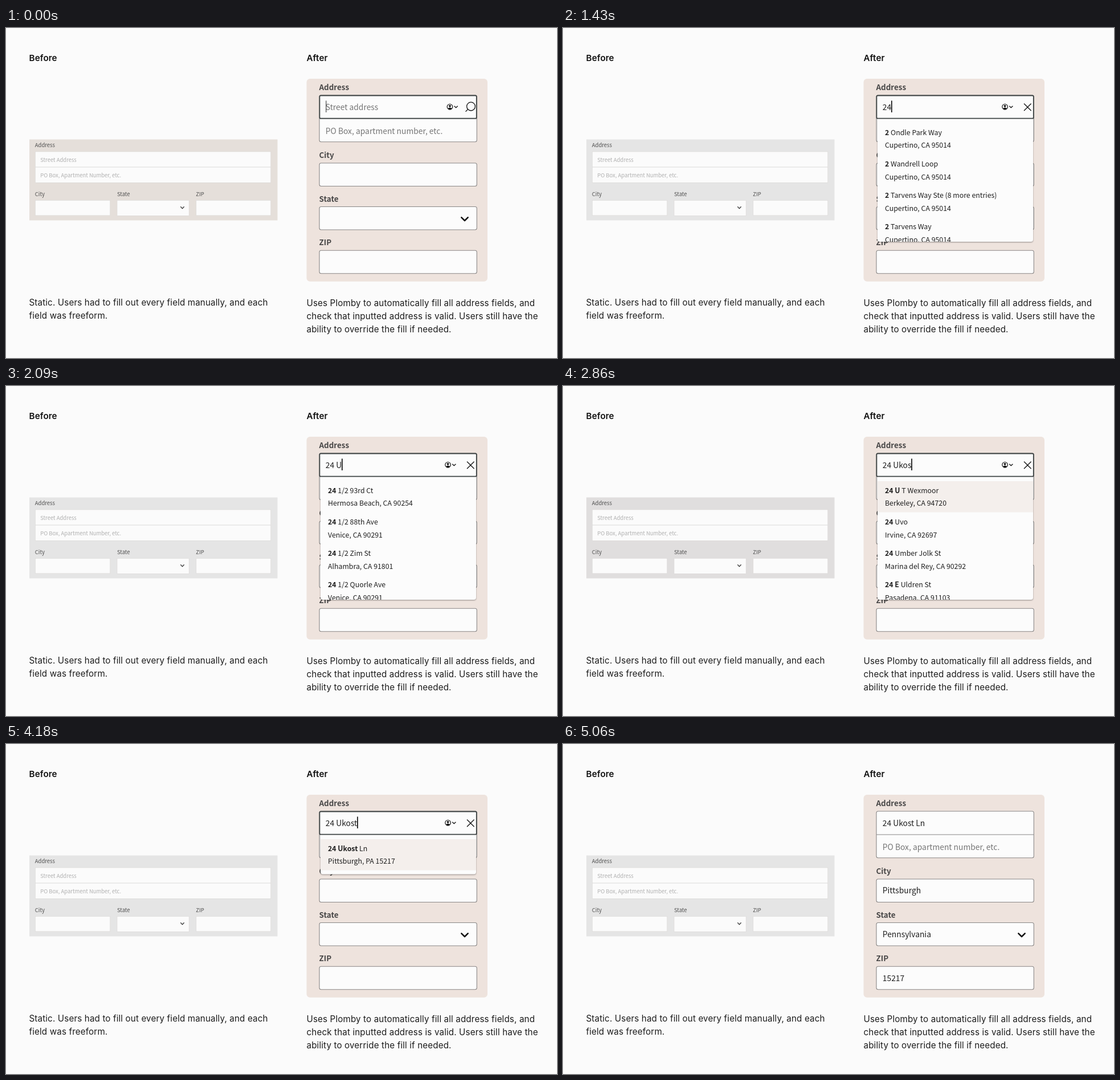
An HTML page for the animation above (7.59 s loop, 967 by 579 pixels).

```html
<!DOCTYPE html>
<html lang="en">
<head>
<meta charset="utf-8">
<title>Address form: before and after</title>
<style>
  html, body { margin: 0; width: 100%; height: 100%; overflow: hidden; background: #fbfbfb; }
  svg { display: block; width: 967px; height: 579px; }
  text { white-space: pre; }
  .form text { font-family: "Noto Sans CJK SC", "Noto Sans CJK JP", "Noto Sans CJK", "Open Sans", sans-serif; }
  .copy text { font: 400 15.2px Inter, sans-serif; letter-spacing: .13px; fill: #1c1c1c; }
  .copy .head { font-weight: 600; fill: #111; }
  .old text { font-size: 9.45px; fill: #505050; }
  .old .hint { fill: #b0b0b0; }
  .old rect { fill: #fbfbfb; stroke: #d9d7d5; stroke-width: .6; }
  .old .panel { stroke: none; }
  .new text { font-size: 13.82px; fill: #1f1f1f; }
  .new .label { font-size: 13.4px; font-weight: 700; fill: #484747; }
  .new .hint { fill: #757575; }
  .box { fill: #fcfcfc; stroke: #8a8887; stroke-width: 1.1; }
  .new .item { font-size: 12.33px; }
  .item tspan { font-weight: 700; }
  .line { fill: none; stroke: #111; stroke-linecap: round; stroke-linejoin: round; }
  #menu .sheet { fill: #fcfcfc; filter: drop-shadow(0 1px 1px rgba(0, 0, 0, .38)); }
</style>
</head>
<body>
<svg viewBox="0 0 967 579">
  <defs><clipPath id="cut"><rect id="cutBox" x="552" y="159" width="273" height="216"/></clipPath></defs>

  <g class="copy">
    <text class="head" x="40.5" y="58">Before</text>
    <text class="head" x="527.5" y="58">After</text>
    <text x="40.5" y="487">Static. Users had to fill out every field manually, and each</text>
    <text x="40.5" y="510">field was freeform.</text>
    <text x="527.5" y="487.5">Uses Plomby to automatically fill all address fields, and</text>
    <text x="527.5" y="510.5">check that inputted address is valid. Users still have the</text>
    <text x="527.5" y="533.5">ability to override the fill if needed.</text>
  </g>

  <g class="form old">
    <rect class="panel" id="panel" x="41" y="195.5" width="435.5" height="142"/>
    <rect x="51.3" y="217" width="413.5" height="54.3"/>
    <path d="M51 244H465" stroke="#dbdad9"/>
    <rect x="51.3" y="302.3" width="131.5" height="26.6"/>
    <rect x="195" y="302.3" width="126.2" height="27"/>
    <rect x="333.8" y="302.3" width="131" height="26.6"/>
    <path class="line" d="M306.7 313.8l2.8 2.9 2.8-2.9" style="stroke:#444;stroke-width:1.4"/>
    <text x="50.8" y="209.3">Address</text>
    <text class="hint" x="60.2" y="234.8">Street Address</text>
    <text class="hint" x="60.2" y="262.3">PO Box, Apartment Number, etc.</text>
    <text x="50.8" y="294.5">City</text>
    <text x="195" y="294.5">State</text>
    <text x="333.3" y="294.5">ZIP</text>
  </g>

  <g class="form new">
    <rect x="527.5" y="89" width="317.5" height="355.7" rx="6" fill="#eee3dd"/>
    <text class="label" x="549.5" y="109">Address</text>
    <text class="label" x="549.5" y="228">City</text>
    <text class="label" x="549.5" y="304.7">State</text>
    <text class="label" x="549.5" y="381.4">ZIP</text>
    <rect class="box" x="550" y="118" width="276.3" height="81.7" rx="3"/>
    <path d="M550 159H826" stroke="#8a8887" stroke-width="1.1"/>
    <rect class="box" x="550" y="237" width="276.3" height="40.5" rx="3"/>
    <rect class="box" x="550" y="313.5" width="276.3" height="40.5" rx="3"/>
    <rect class="box" x="550" y="390.3" width="276.3" height="40.5" rx="3"/>
    <path class="line" d="M799.3 332.3l5.7 5.7 5.7-5.7" style="stroke-width:2.5"/>
    <text class="hint" x="560.8" y="185.5">PO Box, apartment number, etc.</text>
    <g id="filled">
      <text x="560.8" y="262.3">Pittsburgh</text>
      <text x="560.8" y="339">Pennsylvania</text>
      <text x="560.8" y="415.8">15217</text>
    </g>

    <g id="menu">
      <path class="sheet" id="sheet"/>
      <rect id="hover" x="552" y="167" width="273" height="54.5" fill="#f4efec"/>
      <g id="items" clip-path="url(#cut)"></g>
    </g>

    <g id="focus">
      <rect x="550.4" y="118.5" width="275.4" height="40.2" rx="2" fill="#fcfcfc" stroke="#3f4444" stroke-width="1.8"/>
      <g id="person">
        <circle class="line" cx="779" cy="138.3" r="4.8" style="stroke-width:1.2"/>
        <circle cx="779" cy="136.8" r="1.9" fill="#111"/>
        <path d="M775.6 141.2q3.4-3.4 6.8 0q-3.4 3.4-6.8 0z" fill="#111"/>
        <path class="line" d="M787 137.2l2.7 2.6 2.7-2.6" style="stroke-width:1.3"/>
      </g>
      <path class="line" id="lens" d="M810.6 142.6L807 146.3M823.4 137.6a7.4 7.4 0 1 1-14.8 0a7.4 7.4 0 1 1 14.8 0" style="stroke-width:1.3"/>
      <path class="line" id="clear" d="M809.4 133l11.8 11.8M821.2 133l-11.8 11.8" style="stroke-width:1.3"/>
    </g>
    <text id="street" x="560.8" y="144"></text>
    <rect id="caret" y="127.5" width="1.7" height="20.5" fill="#111"/>
  </g>
</svg>
<script>
const LOOP = 7590;
const $ = id => document.getElementById(id);

// Each entry: matched prefix, rest of the street line, city line
const LISTS = {
  two: [
    ["2", " Ondle Park Way", "Cupertino, CA 95014"],
    ["2", " Wandrell Loop", "Cupertino, CA 95014"],
    ["2", " Tarvens Way Ste (8 more entries)", "Cupertino, CA 95014"],
    ["2", " Tarvens Way", "Cupertino, CA 95014"]
  ],
  number: [
    ["24", " 1/2 93rd Ct", "Hermosa Beach, CA 90254"],
    ["24", " 1/2 88th Ave", "Venice, CA 90291"],
    ["24", " 1/2 Zim St", "Alhambra, CA 91801"],
    ["24", " 1/2 Quorle Ave", "Venice, CA 90291"]
  ],
  letter: [
    ["24 U", " T Wexmoor", "Berkeley, CA 94720"],
    ["24", " Uvo", "Irvine, CA 92697"],
    ["24", " Umber Jolk St", "Marina del Rey, CA 90292"],
    ["24 E", " Uldren St", "Pasadena, CA 91103"]
  ],
  match: [["24 Ukost", " Ln", "Pittsburgh, PA 15217"]]
};

// Changes in time; each one adds to the state before it
const STEPS = [
  { at: 0, text: "", caret: .55, list: null, hover: false, done: false, panel: "#e5dfda" },
  { at: 110, caret: 0 },
  { at: 440, caret: 1 },
  { at: 1100, text: "2" },
  { at: 1430, text: "24", list: "two", panel: "#e5e5e5" },
  { at: 1760, list: "number" },
  { at: 1870, text: "24 " },
  { at: 2090, text: "24 U" },
  { at: 2420, list: "letter" },
  { at: 2530, text: "24 Uk" },
  { at: 2750, text: "24 Uko", hover: true, panel: "#e0dede" },
  { at: 2860, text: "24 Ukos" },
  { at: 2970, text: "24 Ukost" },
  { at: 3190, list: "match", panel: "#e5e5e5" },
  { at: 3630, caret: .5 },
  { at: 3740, caret: 0 },
  { at: 4070, caret: .5 },
  { at: 4180, caret: 1 },
  { at: 4620, text: "24 Ukost Ln", caret: 0, list: null, done: true }
];

const show = (id, on) => $(id).style.display = on ? "" : "none";

function drawMenu(name) {
  show("menu", name);
  if (!name) return;
  const list = LISTS[name];
  const bottom = list.length > 1 ? 375 : 228.6;
  $("sheet").setAttribute("d", `M552 159H825V${bottom - 4}q0 4-4 4H556q-4 0-4-4z`);
  $("cutBox").setAttribute("height", bottom - 159);
  $("items").innerHTML = list.map(([bold, rest, city], i) => {
    const y = 188.1 + 55.1 * i;
    return `<text class="item" x="565" y="${y}"><tspan>${bold}</tspan>${rest}</text>` +
      `<text class="item" x="565" y="${y + 22.3}">${city}</text>`;
  }).join("");
}

function draw(s) {
  const typed = s.text !== "";
  const street = $("street");
  street.textContent = typed ? s.text : "Street address";
  street.setAttribute("class", typed ? "" : "hint");
  $("caret").setAttribute("x", typed ? 560.8 + street.getComputedTextLength() - .2 : 560.9);
  $("caret").style.opacity = s.caret;
  $("person").setAttribute("transform", `translate(${typed ? -3.4 : 0} 0)`);
  show("lens", !typed);
  show("clear", typed);
  show("focus", !s.done);
  show("filled", s.done);
  show("hover", s.hover);
  $("panel").style.fill = s.panel;
  drawMenu(s.list);
}

let last = -1;
function tick() {
  const t = performance.now() % LOOP;
  const past = STEPS.filter(s => s.at <= t);
  if (past.length !== last) {
    last = past.length;
    draw(Object.assign({}, ...past));
  }
  requestAnimationFrame(tick);
}
tick();
</script>
</body>
</html>
```
